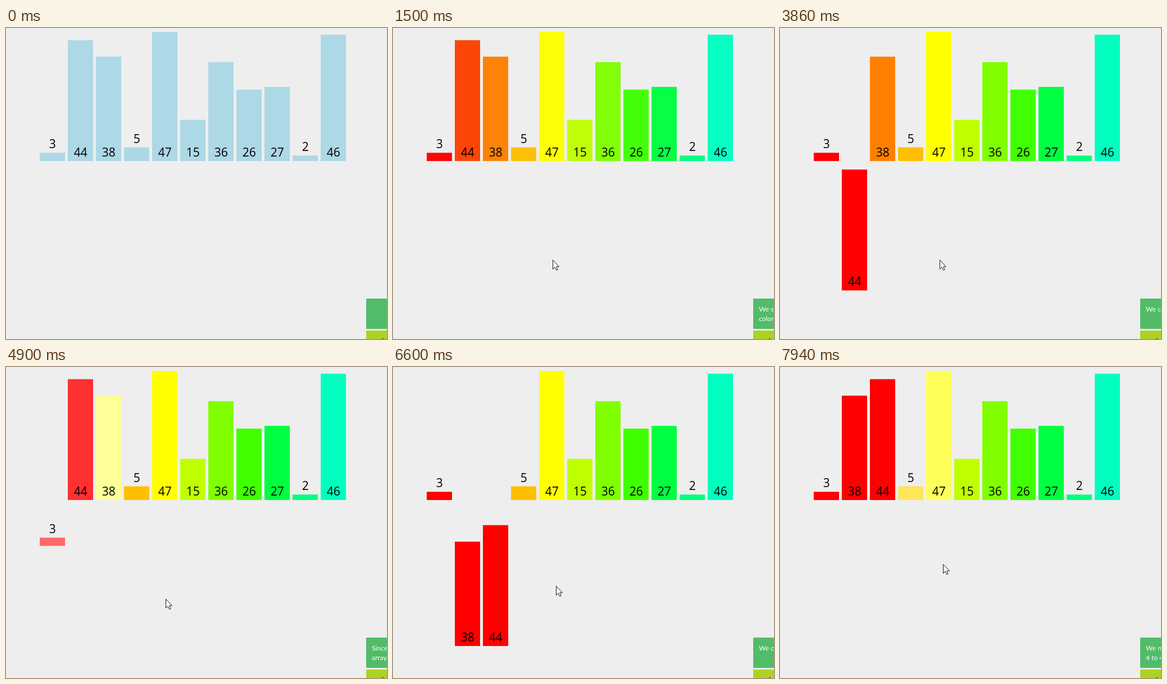
Animation, 678 px wide and 554 px high, one loop 8 s. Source, as an HTML page with a canvas:

```html
<!DOCTYPE html>
<html lang="en">
<head>
<meta charset="utf-8">
<title>Merge sort</title>
<style>
  html, body { margin: 0; width: 100%; height: 100%; overflow: hidden; background: #eee; }
  canvas { display: block; }
</style>
</head>
<body>
<canvas id="stage" width="678" height="554"></canvas>
<script>
const ctx = document.getElementById('stage').getContext('2d');
const LOOP = 8000, FIRST_STEP = 1262, STEP = 501.5, TWEEN = 300, CAPTION_LEAD = 40;
const BASELINE = 237, DROP = 260, UNIT = 230 / 47;
const RED = [255, 0, 0], BLUE = [173, 216, 230];

const values = [3, 44, 38, 5, 47, 15, 36, 26, 27, 2, 46];
const hues = values.map((_, i) => 15 * (i < 8 ? i : i + 1));

// Each action: [step, bar index, kind, target slot]
const actions = [
  ...values.map((_, i) => [0, i, 'paint']),
  [1, 0, 'glow'], [1, 1, 'glow'],
  [2, 0, 'drop', 0], [3, 1, 'drop', 1],
  [4, 0, 'rise'], [5, 1, 'rise'],
  [6, 0, 'glow'], [6, 2, 'glow'],
  [7, 0, 'drop', 0], [7, 1, 'glow'],
  [8, 2, 'drop', 1], [9, 1, 'drop', 2],
  [10, 0, 'rise'], [11, 2, 'rise'], [12, 1, 'rise'],
  [13, 3, 'glow'], [13, 4, 'glow']
];

const captions = [
  [0, 'We split the array', 'color coded'],
  [1, 'We now merge', '1 to 1 inclusive'],
  [2, 'Since left is smaller', 'array.'],
  [4, 'We copy back', ''],
  [6, 'We now merge', '2 to 2 inclusive'],
  [7, 'Since left is smaller', 'array.'],
  [9, 'Since one side is empty', ''],
  [10, 'We copy back', ''],
  [13, 'We now merge', '4 to 4 inclusive']
];

// Pointer path: [time, x, y]
const pointerPath = [
  [500, 218, 535], [640, 284, 413], [5740, 284, 413], [5790, 285, 413],
  [6100, 285, 413], [6500, 290, 390], [6850, 290, 390], [7170, 290, 351], [LOOP, 290, 351]
];

const clamp = u => Math.max(0, Math.min(1, u));
const lerp = (a, b, p) => a + (b - a) * p;
const ease = u => u < 0.5 ? 4 * u ** 3 : 1 - 4 * (1 - u) ** 3;
const stepTime = step => FIRST_STEP + STEP * step;

function hueColor(hue) {
  return [5, 3, 1].map(n => {
    const k = (n + hue / 60) % 6;
    return 255 - 255 * clamp(Math.min(k, 4 - k));
  });
}

function barsAt(t) {
  const bars = values.map((value, i) => ({ value, slot: i, y: 0, color: BLUE }));
  for (const [step, i, kind, slot] of actions) {
    const p = ease(clamp((t - stepTime(step)) / TWEEN));
    if (!p) continue;
    const bar = bars[i];
    let goal = bar.color;
    if (kind === 'paint') goal = hueColor(hues[i]);
    if (kind === 'glow') goal = bar.color.map(c => Math.min(255, c + 153));
    if (kind === 'drop') {
      goal = RED;
      bar.slot = lerp(bar.slot, slot, p);
      bar.y = lerp(bar.y, DROP, p);
    }
    if (kind === 'rise') bar.y = lerp(bar.y, 0, p);
    bar.color = bar.color.map((c, n) => lerp(c, goal[n], p));
  }
  return bars;
}

function drawBars(t) {
  const bars = barsAt(t);
  for (const { value, slot, y, color } of bars) {
    const x = 60 + 50 * slot, height = value * UNIT, bottom = BASELINE + y;
    ctx.fillStyle = `rgb(${color.map(Math.round)})`;
    ctx.fillRect(x, bottom - height, 45, height);
    ctx.fillStyle = '#000';
    ctx.font = '21px "Open Sans", "Noto Sans", sans-serif';
    ctx.textAlign = 'center';
    ctx.fillText(value, x + 22.7, bottom - 8 - (value < 10 ? height : 0));
  }
}

function drawPanels(t) {
  ctx.fillStyle = '#52bc69';
  ctx.fillRect(641, 482, 37, 54);
  ctx.fillStyle = '#abd321';
  ctx.fillRect(641, 539, 37, 15);
  ctx.fillStyle = '#222';
  ctx.fillRect(669, 553, 3, 1);
  const caption = captions.filter(c => t >= stepTime(c[0]) - CAPTION_LEAD).pop();
  if (!caption) return;
  ctx.fillStyle = '#fff';
  ctx.font = '12px Lato, sans-serif';
  ctx.textAlign = 'left';
  ctx.fillText(caption[1], 651, 505);
  ctx.fillText(caption[2], 651, 522);
}

function drawPointer(t) {
  const next = pointerPath.findIndex(point => point[0] > t);
  if (next < 1) return;
  const [t0, x0, y0] = pointerPath[next - 1], [t1, x1, y1] = pointerPath[next];
  const p = (t - t0) / (t1 - t0);
  ctx.save();
  ctx.translate(Math.round(lerp(x0, x1, p)), Math.round(lerp(y0, y1, p)));
  const arrow = new Path2D('M.5 .5V16.5L4.2 13L6.8 18.5L9.2 17.5L6.8 12H11.5Z');
  ctx.fillStyle = '#fff';
  ctx.strokeStyle = '#112';
  ctx.fill(arrow);
  ctx.stroke(arrow);
  ctx.restore();
}

function draw(now) {
  const t = now % LOOP;
  ctx.fillStyle = '#eee';
  ctx.fillRect(0, 0, 678, 554);
  drawBars(t);
  drawPanels(t);
  drawPointer(t);
}

const start = performance.now();
function tick() {
  draw(performance.now() - start);
  requestAnimationFrame(tick);
}
tick();
</script>
</body>
</html>
```
